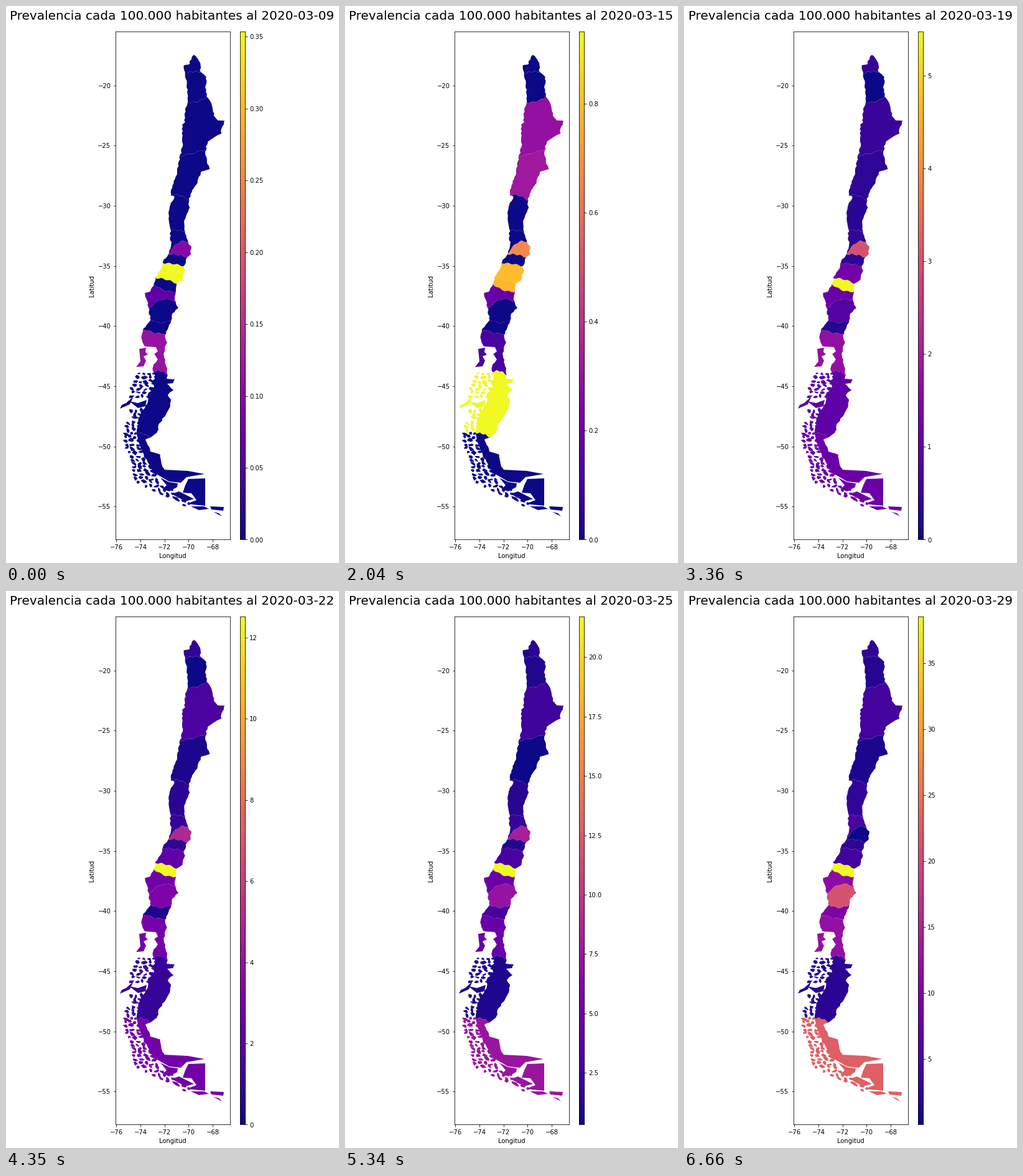
Animation of 535x895 px, one loop 6990 ms. Source, as a matplotlib script:

```python
import numpy as np
import matplotlib.pyplot as plt
from matplotlib.animation import FuncAnimation
from matplotlib.collections import PolyCollection
from matplotlib.transforms import Affine2D

W, H, STEP = 535, 895, 30
STARTS = [0, 340, 670, 1000] + [1380 + 330 * k for k in range(17)]
METRO, MAULE, NUBLE, BIOBIO, LAKES, AYSEN, SOUTH = 6, 8, 9, 10, 13, 14, 15
rng = np.random.default_rng(9)

# Population (in 100 000s), then cumulative cases on the late key days
KEY_DAYS = [9, 12, 15, 19, 22, 25, 29]
CASES = [
    (2.52, 0, 1, 2, 3, 6),
    (3.83, 0, 0, 0, 4, 6),
    (6.92, 2, 3, 11, 16, 29),
    (3.15, 1, 1, 1, 1, 3),
    (8.36, 0, 2, 5, 11, 21),
    (19.6, 0, 7, 18, 36, 92),
    (81.25, 54, 238, 400, 652, 1242),
    (9.91, 0, 3, 7, 10, 23),
    (11.32, 9, 14, 25, 32, 44),
    (5.116, 4, 28, 64, 111, 197),
    (16.64, 3, 18, 46, 78, 186),
    (10.14, 0, 8, 32, 72, 210),
    (4.06, 0, 1, 1, 11, 39),
    (8.91, 1, 15, 26, 40, 107),
    (1.073, 1, 1, 1, 1, 2),
    (1.784, 0, 2, 5, 13, 40),
]
EARLY = {METRO: (8, 23), MAULE: (4, 7), NUBLE: (0, 1), BIOBIO: (1, 1), LAKES: (1, 1)}

# Coast lines from north to south
EAST = [
    (304, 79), (311, 91), (313, 106), (323, 114), (320, 128), (323, 146), (329, 157),
    (334, 175), (340, 184), (351, 182), (345, 205), (324, 218), (320, 234), (324, 253),
    (327, 262), (314, 266), (308, 283), (299, 296), (295, 309), (294, 325), (286, 345),
    (287, 362), (292, 379), (297, 386), (296, 399), (291, 404), (286, 418), (287, 425),
    (284, 440), (274, 446), (273, 459), (270, 472), (276, 486), (267, 494), (265, 506),
    (256, 528), (258, 540), (254, 560), (260, 593), (258, 599), (271, 600), (269, 606),
    (259, 607), (268, 617), (259, 625), (265, 632), (261, 650), (246, 672), (243, 686),
    (232, 693), (224, 696), (232, 716), (248, 721), (249, 735), (254, 746),
]
WEST = [
    (301, 79), (297, 86), (294, 94), (286, 95), (288, 109), (290, 122), (292, 155),
    (288, 164), (287, 186), (283, 193), (283, 226), (280, 241), (276, 262), (271, 280),
    (267, 292), (264, 304), (271, 306), (263, 322), (261, 340), (264, 359), (265, 386),
    (260, 399), (253, 410), (249, 423), (240, 437), (239, 445), (231, 459), (223, 461),
    (230, 488), (232, 504), (221, 518), (218, 533), (222, 547), (240, 548), (245, 555),
    (238, 560), (245, 568), (236, 576), (237, 590), (241, 597), (233, 603), (238, 612),
    (229, 622), (226, 641), (214, 660), (210, 686), (212, 700), (228, 735), (240, 753),
    (248, 768), (300, 801),
]
OUTER = [(208, 590), (199, 612), (184, 645), (198, 655), (200, 664), (187, 671),
         (184, 700), (195, 722), (203, 763), (243, 784), (278, 801)]

# Borders: y on the west coast, y on the east coast, sag in between
BORDERS = [
    (79, 79, 0), (109, 106, -2), (155, 146, 3), (241, 230, 1), (304, 313, -4),
    (359, 362, 0), (398, 379, -8), (399, 404, -2), (413, 418, -1), (437, 446, -2),
    (447, 459, 4), (486, 475, -9), (504, 504, 5), (519, 527, 2), (588, 593, -4),
    (686, 693, -2), (753, 746, 0),
]

CHILOE = [(214, 551), (225, 549), (224, 556), (228, 560), (221, 563), (225, 570),
          (221, 579), (209, 580), (216, 571)]
GULF = [(183, 647), (186, 641), (193, 638), (205, 627), (199, 640)]
STRAIT = [(198, 635), (212, 638), (226, 633), (224, 643), (212, 646)]
PLAIN = [(238, 750), (252, 745), (292, 747), (319, 752), (290, 757), (281, 766),
         (262, 764)]
FUEGO = [(293, 760), (320, 759), (320, 803), (290, 800), (306, 794), (298, 783),
         (284, 782), (288, 770)]
CAPE = [(248, 758), (262, 765), (276, 767), (275, 773), (262, 780), (252, 776),
        (258, 770)]
SOUND = [(266, 784), (278, 780), (302, 792), (288, 796)]
ISLES = [(328, 804), (350, 805), (349, 811), (330, 809)]
HORN = [(333, 813), (342, 815), (347, 820)]
CHANNEL = [(297, 804), (318, 804), (326, 808), (310, 810)]


def rates(day):
    out = []
    for k, (people, *late) in enumerate(CASES):
        n = np.round(np.interp(day, KEY_DAYS, [*EARLY.get(k, (0, 0)), *late]))
        if k == NUBLE:
            n = {16: 12, 17: 24, 18: 24}.get(day, n)
        if k == METRO and n >= 1000:  # thousands point read as a decimal point
            n /= 1000
        out.append(n / people)
    return np.array(out)


def coast(points):
    """Return x as a function of y, with small seeded inlets."""
    x, y = np.transpose(points)
    y = np.maximum.accumulate(y + np.arange(len(y)) * 1e-6)
    grid = np.arange(75, 810, 3.5)
    noise = rng.uniform(-1.3, 1.3, len(grid))
    return lambda at: np.interp(at, y, x) + np.interp(at, grid, noise)


east, west, outer = coast(EAST), coast(WEST), coast(OUTER)


def shore(side, y0, y1):
    y = np.linspace(y0, y1, int(abs(y1 - y0)) * 2 + 2)
    return np.column_stack([side(y), y])


def border(y0, y1, sag):
    u = np.linspace(0, 1, 25)
    x = west(y0) + (east(y1) - west(y0)) * u
    y = y0 + (y1 - y0) * u + sag * np.sin(np.pi * u) + np.sin(5 * np.pi * u)
    return np.column_stack([x, y])


def shards(y):
    """One row of small splintered islands off the mainland."""
    x, end = outer(y) + rng.uniform(0, 4), west(y)
    tilt = 0.25 if y < 640 else 0.5
    while x < end - 2:
        a, b = rng.uniform(3, 6.5), rng.uniform(2, 3.8)
        ang = rng.uniform(-0.4, 0.4, 6) + np.arange(6) * np.pi / 3
        rad = rng.uniform(0.55, 1.15, 6)
        turn = tilt + rng.normal(0, 0.45)
        u, v = a * rad * np.cos(ang), b * rad * np.sin(ang)
        cy = y + rng.uniform(-2, 2)
        yield np.column_stack([x + a + u * np.cos(turn) - v * np.sin(turn),
                               cy + u * np.sin(turn) + v * np.cos(turn)])
        x += 1.75 * a + rng.uniform(0, 2)


polys, owner = [], []


def add(k, *shapes):
    for shape in shapes:
        owner.append(k)
        polys.append(np.array(shape))


for k, (top, low) in enumerate(zip(BORDERS, BORDERS[1:])):
    add(k, np.vstack([border(*top), shore(east, top[1], low[1]),
                      border(*low)[::-1], shore(west, low[0], top[0])]))
add(LAKES, CHILOE)
add(AYSEN, GULF, STRAIT)
add(SOUTH, PLAIN, FUEGO, CAPE, SOUND, ISLES, HORN, CHANNEL)
for y in range(591, 802, 6):
    if not 628 < y < 650:
        add(AYSEN if y < 685 else SOUTH, *shards(y))

fig = plt.figure(figsize=((W + 0.001) / 72, (H + 0.001) / 72), dpi=72, facecolor="white")


def box(x0, y0, x1, y1):
    return fig.add_axes([x0 / W, 1 - y1 / H, (x1 - x0) / W, (y1 - y0) / H])


title = fig.text(267 / W, 1 - 22 / H, "", size=20, ha="center")

SCALE = 19.34
ax = box(175.5, 41.5, 359.5, 857.5)
stage = Affine2D().scale(1 / W, -1 / H).translate(0, 1) + fig.transFigure
land = PolyCollection(polys, transform=stage, linewidths=0)
ax.add_collection(land, autolim=False)
ax.set(xlim=(-76.093, -76.093 + 184 / SCALE), ylim=(-15.553 - 816 / SCALE, -15.553),
       xticks=range(-76, -67, 2), yticks=range(-55, -19, 5),
       xlabel="Longitud", ylabel="Latitud")

cax = box(375.5, 41.5, 384.2, 857.5)
ramp = cax.imshow(np.arange(256)[:, None], cmap="plasma", origin="lower", aspect="auto")
cax.set_xticks([])
cax.yaxis.tick_right()


def draw(i):
    # changes that fall inside a step are shown at the start of that step
    day = 8 + np.searchsorted(STARTS, i * STEP + 20, side="right")
    values = rates(day)
    low, high = values.min(), values.max()
    land.set_facecolor(plt.cm.plasma((values - low) / (high - low))[owner])
    ramp.set_extent((0, 1, low, high))
    cax.set(xlim=(0, 1), ylim=(low, high))
    title.set_text(f"Prevalencia cada 100.000 habitantes al 2020-03-{day:02d}")
    return land, ramp, title


anim = FuncAnimation(fig, draw, frames=6990 // STEP, interval=STEP, repeat=True,
                     repeat_delay=0)
plt.show()
```
